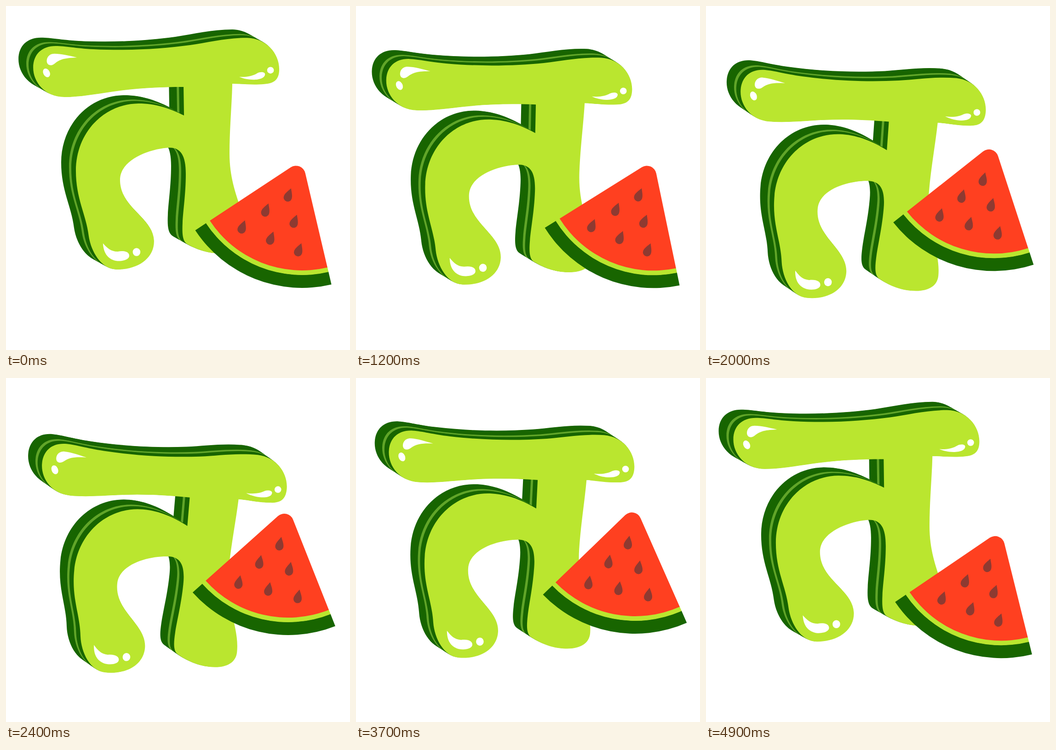
Animation of 748 by 748 pixels, one loop 5 s. Source, as an HTML page:

```html
<!DOCTYPE html>
<html lang="en">
<head>
<meta charset="utf-8">
<title>Melon letter</title>
<style>
  html, body { margin: 0; width: 100%; height: 100%; overflow: hidden; background: #fff; }
  svg { display: block; width: 100vw; height: 100vh; }
</style>
</head>
<body>
<svg viewBox="0 0 748 748">
  <defs>
    <path id="face" d="M386 176C330 176 280 179 230 186.5C195 191.5 160 198 128 198
      C84 198 59 165 59 134C59 105 78 87 108 87C130 87 150 92 190 94
      C270 98 340 93 400 85C440 79 480 69 524 69C566 70 594 103 594 137
      C594 158 585 168 562 169.5C535 172 515 169 492 169C491 215 486 265 486 320
      C486 405 522 445 522 500C522 525 500 538 466 538C436 538 410 527 393 517
      C384 510 383 495 384 472C385 445 391 410 391 365C391 325 380 308 355 308
      C315 310 248 333 248 378C248 440 322 460 322 512C322 548 288 573 242 573
      C208 573 185 535 180 500C174 452 152 420 152 358C152 278 210 213 288 212
      C325 212 355 222 387 238Z"/>
    <path id="seed" d="M0 -16C3 -10 9 -2 9 5A9 9 0 0 1 -9 5C-9 -2 -3 -10 0 -16Z"/>
  </defs>
  <g id="letter">
    <g id="sides"></g>
    <use href="#face" fill="#bae62f"/>
    <g fill="#fff">
      <path d="M154 112C135 108 120 104 105 104C92 104 87 115 89 123C91 130 99 131 106 125C118 115 130 113 154 112Z"/>
      <ellipse cx="88" cy="145.5" rx="7" ry="10" transform="rotate(-28 88 145.5)"/>
      <path d="M507 154C525 155 538 151 546 146C554 142 564 143 563 149C562 157 550 160 538 160C526 160 517 158 507 154Z"/>
      <circle cx="575" cy="139.5" r="7.3"/>
      <path d="M211 516C220 526 228 534 243 534C258 531 269 535 268 544C267 552 252 556 239 554C220 550 212 535 211 516Z"/>
      <ellipse cx="284" cy="535" rx="8.3" ry="8.8"/>
    </g>
  </g>
  <g id="slice">
    <path id="rind" fill="#186500"/>
    <path id="pith" fill="#bae62f"/>
    <path id="flesh" fill="#ff4020"/>
    <g id="seeds" fill="#8e3a31"></g>
  </g>
</svg>
<script>
const NS = 'http://www.w3.org/2000/svg';
const $ = id => document.getElementById(id);
const rad = deg => deg * Math.PI / 180;

function addUse(parent, href, attrs) {
  const el = document.createElementNS(NS, 'use');
  el.setAttribute('href', href);
  for (const k in attrs) el.setAttribute(k, attrs[k]);
  parent.append(el);
}

// Extruded sides: copies of the face swept from the back to the front.
const DEPTH = 32, RISE = 18 / DEPTH;
for (let d = DEPTH; d > 0; d--) {
  const fill = d <= 15 && d > 10 ? '#61a529' : '#186500';
  addUse($('sides'), '#face', { x: -d, y: -d * RISE, fill });
}

// The slice is a sector around its tip.
const TIP = [643, 333.5], LEFT = 146.3, RIGHT = 76.5;
const at = (r, deg) =>
  (TIP[0] + r * Math.cos(rad(deg))).toFixed(1) + ' ' + (TIP[1] + r * Math.sin(rad(deg))).toFixed(1);
const arc = (r, to, sweep) => `A${r} ${r} 0 0 ${sweep} ${at(r, to)}`;
const band = (outer, inner) =>
  `M${at(outer, LEFT)}${arc(outer, RIGHT, 0)}L${at(inner, RIGHT)}${arc(inner, LEFT, 1)}Z`;

$('rind').setAttribute('d', band(278.5, 250));
$('pith').setAttribute('d', band(250.5, 239));
$('flesh').setAttribute('d',
  `M${at(240.5, LEFT)}${arc(240.5, RIGHT, 0)}L${at(29.7, RIGHT)}A20.7 20.7 0 0 0 ${at(29.7, LEFT)}Z`);

const SEEDS = [[612, 410], [563, 443], [512, 480], [625, 467], [574, 504], [635, 529]];
for (const [x, y] of SEEDS)
  addUse($('seeds'), '#seed', { transform: `translate(${x + 1.8} ${y + .8}) rotate(20)` });

function place(id, dx, dy, turn, x, y) {
  $(id).setAttribute('transform', `translate(${dx} ${dy}) rotate(${turn} ${x} ${y})`);
}

const LOOP = 5000, STEP = 100;

function draw(ms) {
  const t = Math.floor((ms % LOOP) / STEP) * STEP;
  const a = 2 * Math.PI * t / LOOP, c = Math.cos(a), s = Math.sin(a);
  place('letter', 0, 37.4 * (1 - c), 2.96 - 3 * Math.cos(a - rad(13)), 300, 315);
  place('slice', -2.8 + 3 * c + 1.9 * s, -11.4 + 11.2 * c + 5 * s,
    -4.3 + 7.35 * Math.cos(a - rad(51.5)), 411.7, 487.5);
}

const start = performance.now();
function tick() {
  draw(performance.now() - start);
  requestAnimationFrame(tick);
}
tick();
</script>
</body>
</html>
```
